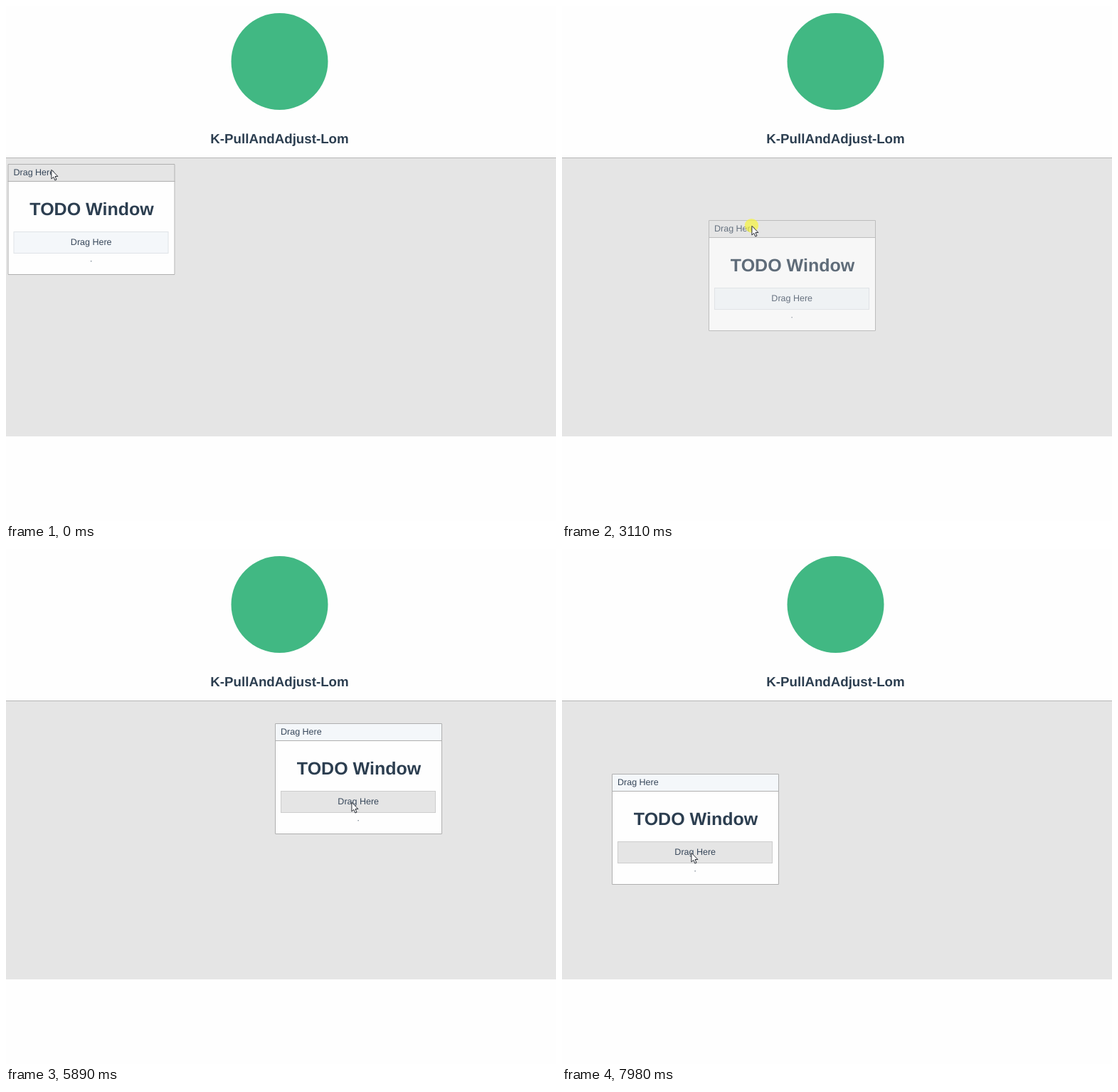
Recreate the animation shown at these times as an HTML page. Size 773x724 px, loop 8000 ms.

```html
<!DOCTYPE html>
<html lang="en">
<head>
<meta charset="utf-8">
<title>Draggable window</title>
<style>
  html, body { margin: 0; width: 100%; height: 100%; overflow: hidden; background: #fefefe; }
  svg { display: block; }
  text { font: 12.5px "Liberation Sans", Arial, sans-serif; fill: #37475a; text-rendering: geometricPrecision; }
  .mid { text-anchor: middle; }
  .h1 { font-size: 25px; }
  .h2 { font-size: 18.72px; }
  .h1, .h2 { font-weight: bold; fill: #2c3e50; }
  .bar { fill: #f4f7fa; }
  .btn { fill: #f4f7fa; stroke: #dfe3e7; }
  .bar.hover { fill: #e5e5e5; }
  .btn.hover { fill: #e5e5e5; stroke: #cdcdcd; }
</style>
</head>
<body>
<svg width="773" height="724" viewBox="0 0 773 724">
  <circle cx="384.5" cy="78" r="68" fill="#41b883"/>
  <text class="h2 mid" x="384.5" y="192.5">K-PullAndAdjust-Lom</text>
  <rect y="213" width="773" height="392" fill="#e5e5e5"/>
  <rect y="213" width="773" height="1" fill="#b6b6b6"/>
  <g id="win">
    <rect width="235" height="156" fill="#fefefe"/>
    <rect id="bar" class="bar" width="235" height="24"/>
    <path d="M.5 .5H234.5V155.5H.5ZM0 24.5H235" fill="none" stroke="#afafaf"/>
    <text x="8" y="16">Drag Here</text>
    <text class="h1 mid" x="118" y="71.7">TODO Window</text>
    <rect id="btn" class="btn" x="8.5" y="95.5" width="217" height="30"/>
    <text class="mid" x="117.2" y="114.4">Drag Here</text>
    <rect x="116.5" y="136" width="1.2" height="1.4" fill="#6b7885"/>
  </g>
  <g id="cursor">
    <circle id="press" r="9.7" fill="#f7f432" fill-opacity=".66"/>
    <path d="M.5 .5V13.3L3.4 10.6L5.4 15.3L7.6 14.4L5.6 9.8H9.5Z" fill="#fdfdfd" stroke="#2b2f36"/>
  </g>
</svg>
<script>
const LOOP = 8000;
const $ = id => document.getElementById(id);
const win = $('win'), bar = $('bar'), btn = $('btn'), cursor = $('cursor'), press = $('press');

// Where the pointer holds the window: start time and offset
const grips = [[0, 60, 7], [4090, 122, 2], [5890, 111, 110]];

// time, mode, window x, y, pointer x, y when it is off the grip
const steps = [
  [0, 'up', 2.5, 222, 63, 229],
  [960, 'drag', 2.5, 222, 63, 229],
  [1750, 'drag', 78, 234],
  [2050, 'drag', 193, 234],
  [2320, 'drag', 198, 239],
  [2540, 'drag', 203, 247],
  [2760, 'drag', 204, 253],
  [3110, 'drag', 206, 301],
  [3300, 'drag', 170, 325],
  [3560, 'drag', 118, 344],
  [3820, 'up', 109, 346],
  [4090, 'drag', 109, 346],
  [4320, 'drag', 183, 323, 372, 277],
  [4660, 'drag', 262, 288],
  [4880, 'drag', 322, 265],
  [5100, 'drag', 348, 254],
  [5390, 'drag', 378, 245, 498, 252],
  [5690, 'up', 378, 245, 490, 305],
  [5890, 'up', 378, 245, 485, 355],
  [6160, 'down', 378, 245, 485, 355],
  [6430, 'drag', 237, 278, 330, 395],
  [6690, 'drag', 214, 284],
  [6930, 'drag', 202, 287],
  [7200, 'drag', 152, 298],
  [7450, 'drag', 122, 307],
  [7730, 'drag', 70, 316],
  [7980, 'up', 70, 316]
];

const at = (table, t) => table.findLast(row => row[0] <= t);
const move = (el, x, y) => el.setAttribute('transform', `translate(${x} ${y})`);
const within = (v, a, b) => v >= a && v <= b;

function draw(t) {
  const [, gx, gy] = at(grips, t);
  const [, mode, x, y, px = x + gx, py = y + gy] = at(steps, t);
  const dx = px - x, dy = py - y;
  move(win, x, y);
  move(cursor, px + 0.4, py + 0.7);
  win.setAttribute('opacity', mode === 'drag' ? 0.72 : 1);
  press.setAttribute('visibility', mode === 'up' ? 'hidden' : 'visible');
  bar.classList.toggle('hover', within(dx, 0, 235) && within(dy, 0, 24));
  btn.classList.toggle('hover', within(dx, 8, 226) && within(dy, 95, 126));
}

const start = performance.now();
function tick() {
  draw((performance.now() - start) % LOOP);
  requestAnimationFrame(tick);
}
tick();
</script>
</body>
</html>
```
